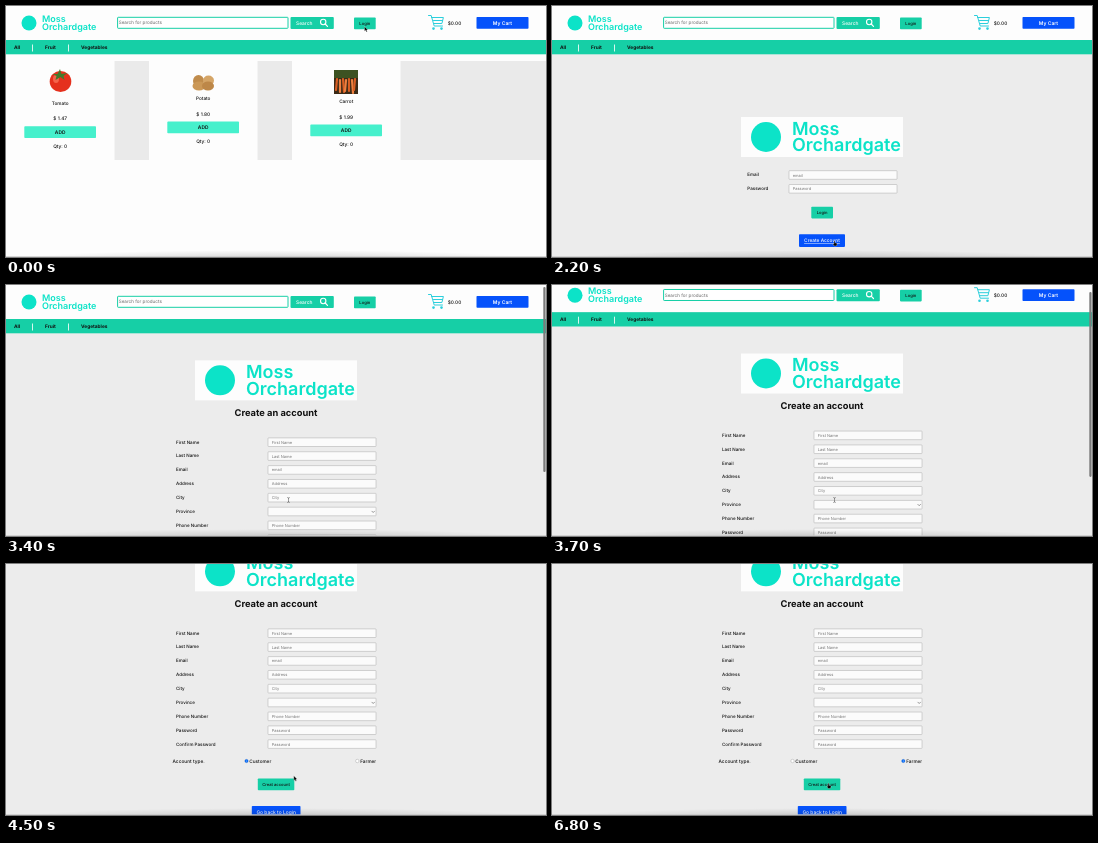
An HTML page for the animation above (6900 ms loop, 540x251 px).

```html
<!DOCTYPE html>
<html lang="en">
<head>
<meta charset="utf-8">
<title>Shop sign-up</title>
<style>
  html, body { margin: 0; width: 100%; height: 100%; overflow: hidden; background: #fcfcfc; }
  svg { display: block; width: 540px; height: 251px; }
  text { font-family: Inter, Roboto, sans-serif; text-rendering: geometricPrecision; white-space: pre; }
</style>
</head>
<body>
<svg id="stage" viewBox="0 0 540 251"></svg>
<script>
const TEAL = '#16cfa6', BLUE = '#0552fb', CYAN = '#0ce3c8', INK = '#111';
const LOOP = 6900;

const rect = (x, y, w, h, fill, more = '') =>
  `<rect x="${x}" y="${y}" width="${w}" height="${h}" fill="${fill}" ${more}/>`;
const ellipse = (x, y, rx, ry, fill, more = '') =>
  `<ellipse cx="${x}" cy="${y}" rx="${rx}" ry="${ry}" fill="${fill}" ${more}/>`;
const circle = (x, y, r, fill, more) => ellipse(x, y, r, r, fill, more);
const path = (d, fill, more = '') => `<path d="${d}" fill="${fill}" ${more}/>`;
const line = (d, color, width) =>
  path(d, 'none', `stroke="${color}" stroke-width="${width}" stroke-linecap="round" stroke-linejoin="round"`);
// y is the middle of the capitals
const text = (x, y, s, size = 4.8, weight = 500, fill = INK, more = '') =>
  `<text x="${x}" y="${y + size * .36}" font-size="${size}" font-weight="${weight}" fill="${fill}" ${more}>${s}</text>`;
const mid = (x, y, s, size, weight, fill, more = '') =>
  text(x, y, s, size, weight, fill, 'text-anchor="middle" ' + more);
const label = (x, y, s) => text(x, y, s, 4.5, 500);
const group = (id, body) => `<g id="${id}">${body}</g>`;

const button = (x, y, w, h, caption, size, weight, fill = TEAL, ink = INK, more = '') =>
  rect(x, y, w, h, fill, 'rx=".8"') + mid(x + w / 2, y + h / 2, caption, size, weight, ink, more);

const field = (x, y, hint) =>
  rect(x, y - 4.3, 108, 8.6, '#fbfbfb', 'stroke="#a8a8a8" stroke-width=".5" rx=".5"') +
  text(x + 3.7, y + .1, hint, 4, 400, '#777');

const brand = (x, y, size) =>
  text(x, y, 'Moss', size, 600, CYAN) + text(x, y + size * .93, 'Orchardgate', size, 600, CYAN);

const banner = y =>
  rect(189, y, 162, 40, '#fdfdfd') + circle(214, y + 20, 15, CYAN) + brand(240, y + 11.2, 18);

function header() {
  const cart = line('M422.5 9.5h2.7l3 10.500h8.3M425.6 11.5h11.8l-1.5 6h-8.5M427.5 14.5h9', '#2ccfdc', 1) +
    circle(427.5, 22.6, 1.3, '#2ccfdc') + circle(435.5, 22.6, 1.3, '#2ccfdc');
  return rect(0, 0, 540, 34, '#fdfdfd') +
    circle(23, 17, 7.5, CYAN) + brand(36, 12.6, 9) +
    rect(111.6, 11.3, 170.4, 11, '#fff', `stroke="${TEAL}" stroke-width="1" rx=".6"`) +
    text(112.7, 16.8, 'Search for products', 4.6, 400, '#666') +
    rect(284.5, 11, 43.3, 12, TEAL, 'rx="1"') + text(290, 17, 'Search', 4.9, 500, '#fff') +
    circle(317.2, 16, 2.7, 'none', 'stroke="#fff" stroke-width="1.1"') + line('M319.2 18l2.3 2.3', '#fff', 1.2) +
    button(348, 11.5, 21.7, 11.7, 'Login', 4.2, 500) +
    cart + text(441.7, 17, '$0.00', 4.8, 500) +
    button(470.5, 11, 52, 11.8, 'My Cart', 5, 600, BLUE, '#fff') +
    rect(0, 34, 540, 14.3, TEAL) +
    text(8, 41.3, 'All', 4.8, 700) + text(39, 41.3, 'Fruit', 4.8, 700) + text(75, 41.3, 'Vegetables', 4.8, 700) +
    rect(26, 38.5, 1, 7, '#d8f7ef') + rect(62, 38.5, 1, 7, '#d8f7ef');
}

function product(x, y, name, price, picture) {
  const c = x + 54.2;
  return rect(x, 55, 108.5, 99, '#fdfdfd') + picture +
    mid(c, y, name, 4.7, 500) + mid(c, y + 15.3, '$ ' + price, 4.8, 500) +
    button(x + 18.3, y + 23, 71.7, 11.7, 'ADD', 4.9, 600, '#46f0cc') +
    mid(c, y + 43, 'Qty: 0', 4.8, 500);
}

function home() {
  const tomato = ellipse(54.5, 75.5, 10.8, 10.5, '#e5301d') + ellipse(50, 73, 3, 4, '#f4644c') +
    path('M54 63l1.5 5 6-1-4 3 1 4-4-3-5 3 1-4-4-2 5 0z', '#447a2c');
  const potato = ellipse(192.5, 75, 5.5, 6, '#c08c4c') + ellipse(202.5, 74.5, 5.5, 5, '#d5a567') +
    ellipse(193, 80, 6.5, 4.5, '#cb9857') + ellipse(202, 80, 6, 4.5, '#bd8748');
  let carrot = rect(328, 64, 24, 24, '#3b2a17') + rect(328, 64, 24, 8, '#3c5222');
  for (let i = 0; i < 7; i++)
    carrot += line(`M${331 + i * 3} ${73 + i % 2}l${(i % 3) - 1} ${11 + i % 3}`, i % 2 ? '#ed8040' : '#d85e23', 2.2);
  return rect(0, 0, 540, 251, '#fdfdfd') + rect(0, 55, 540, 99, '#eaeaea') +
    product(0, 97.3, 'Tomato', '1.47', tomato) +
    product(143, 92.6, 'Potato', '1.80', potato) +
    product(286, 95.6, 'Carrot', '1.99', carrot) + header();
}

const login = () => rect(0, 0, 540, 251, '#ececec') + header() + banner(111) +
  label(195.3, 168.7, 'Email') + field(237, 169, 'email') +
  label(195.3, 182.6, 'Password') + field(237, 182.8, 'Password') +
  button(259.3, 200.7, 21.7, 11.7, 'Login', 4.1, 500) +
  button(247, 228.2, 46, 12.7, 'Create Account', 4.8, 500, BLUE, '#fff', 'text-decoration="underline"');

function signup() {
  const labels = ['First Name', 'Last Name', 'Email', 'Address', 'City', 'Province', 'Phone Number', 'Password', 'Confirm Password'];
  const hints = { Email: 'email', Province: '', 'Confirm Password': 'Password' };
  const rows = labels.map((name, i) => {
    const y = 157 + i * 13.86;
    return label(170, y, name) + field(262, y + .2, hints[name] ?? name);
  }).join('');
  const radio = (x, id) => circle(x, 285, 1.7, '#fff', 'stroke="#999" stroke-width=".4"') +
    group(id, circle(x, 285, 1.8, '#0a6cf5') + circle(x, 285, .4, '#fff'));
  return rect(0, 0, 540, 351, '#ececec') + header() + banner(75.3) +
    mid(270, 127.7, 'Create an account', 9.3, 700) + rows +
    line('M365.9 226.200l1.300 1.300 1.300-1.300', '#555', .6) +
    text(166.5, 285.2, 'Account type.') +
    radio(240.5, 'customer') + text(243.3, 285.2, 'Customer', 4.7) +
    radio(351.3, 'farmer') + text(354.2, 285.2, 'Farmer', 4.7) +
    button(251.8, 302.4, 36.5, 11.8, 'Creat account', 4.1, 500) +
    button(245.8, 330, 48.7, 13, 'Go back to Login', 4.9, 500, BLUE, '#fff', 'text-decoration="underline"');
}

const outline = 'stroke="#fff" stroke-width=".3" stroke-linejoin="round"';
const cursors = {
  arrow: path('M0 0v4.800l1.100-1 .8 1.700 .9-.4-.8-1.700h1.500z', '#000', outline),
  hand: path('M-.5 0q.5-.5 1 0v1.700l1.700.5q.5.300.300 1l-.5 1.700h-2.300l-1.500-2q.300-.6 1.300 0z', '#000', outline),
  beam: line('M-.8-2.500q.8 0 .8.700v3.600q0 .7-.8.7M.8-2.500q-.8 0-.8.700M.8 2.500q-.8 0-.8-.7', '#333', .45)
};

// soft shade along the lower edge of the window
const shade = `<radialGradient id="shade"><stop stop-opacity=".16"/><stop offset="1" stop-opacity="0"/></radialGradient>` +
  ellipse(270, 252, 250, 8, 'url(#shade)') + rect(0, 250.3, 540, .7, '#c8c8c8');

const stage = document.getElementById('stage');
stage.innerHTML = group('home', home()) + group('login', login()) + group('signup', signup()) + shade +
  group('bar', rect(537.3, 0, 2.3, 185, '#7c7c7c', 'rx="1.1"')) +
  group('cursor', Object.keys(cursors).map(k => group(k, cursors[k])).join(''));

const $ = id => document.getElementById(id);
const show = (id, on) => $(id).setAttribute('display', on ? 'inline' : 'none');
const move = (id, x, y) => $(id).setAttribute('transform', `translate(${x} ${y})`);

// eased value at time t along [time, value] keys
function track(keys, t) {
  const i = keys.findIndex(k => k[0] > t);
  if (i < 0) return keys[keys.length - 1][1];
  if (i === 0) return keys[0][1];
  const [t0, a] = keys[i - 1], [t1, b] = keys[i];
  const p = (t - t0) / (t1 - t0);
  return a + (b - a) * p * p * (3 - 2 * p);
}

const cursorX = [[0, 358.5], [1000, 358.5], [1600, 284], [2200, 282.5], [4400, 282.5], [5000, 352.5], [5750, 352.5], [6350, 292], [6700, 276.5]];
const cursorY = [[0, 20.5], [400, 18], [1000, 18], [1600, 236], [2200, 235], [3000, 235], [3350, 215], [3700, 215], [4000, 213], [4400, 213], [5000, 197.5], [5750, 197.5], [6350, 240], [6700, 219.5]];
const scrollY = [[3650, 0], [3950, 88.6], [4150, 88.6], [4500, 88]];

function draw(now) {
  const t = now % LOOP;
  const scroll = track(scrollY, t);
  show('home', t < 400);
  show('login', t >= 400 && t < 3000);
  show('signup', t >= 3000);
  show('customer', t < 5500);
  show('farmer', t >= 5500);
  move('signup', 0, -scroll);
  show('bar', t >= 3000 && t < 4500);
  move('bar', 0, 2 + scroll * .73);

  const kind = t < 200 || (t > 1050 && t < 1550) || (t > 4450 && t < 4950) || (t > 5800 && t < 6400) ? 'arrow'
    : t >= 3050 && t < 4450 ? 'beam' : 'hand';
  for (const k in cursors) show(k, k === kind);
  move('cursor', track(cursorX, t), track(cursorY, t));
  requestAnimationFrame(draw);
}
requestAnimationFrame(draw);
</script>
</body>
</html>
```
